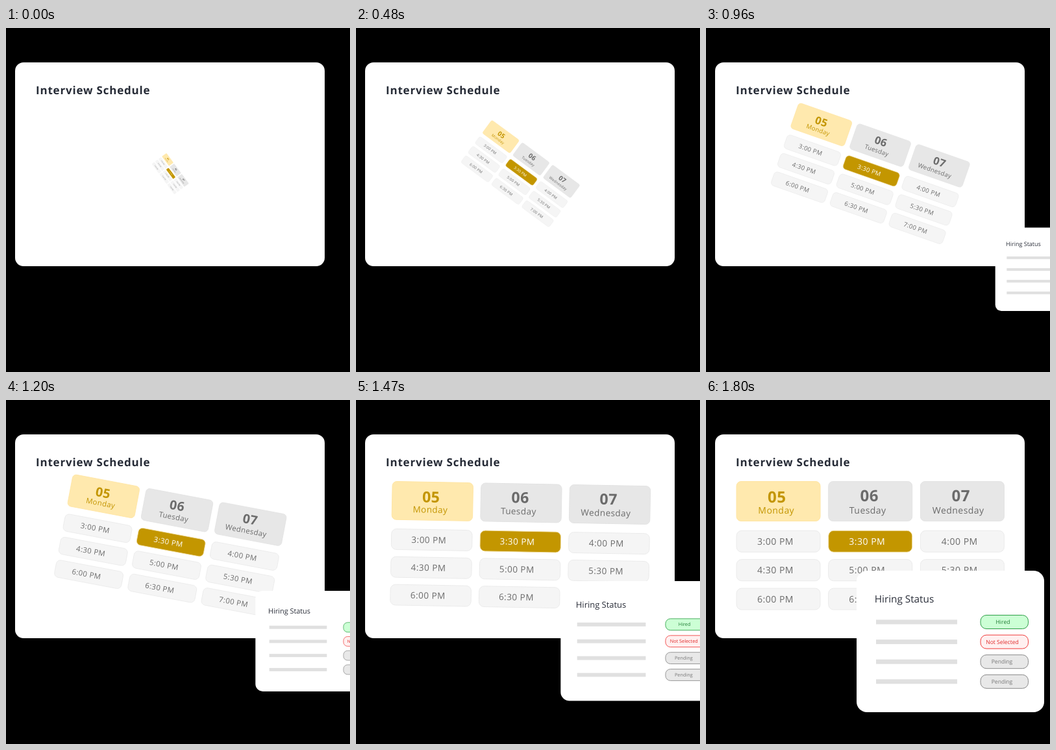
Write an HTML page that moves like this. It is 530 px wide and 530 px high and loops after 2.61 s.

```html
<!DOCTYPE html>
<html lang="en">
<head>
<meta charset="utf-8">
<title>Interview Schedule</title>
<style>
  html, body { margin: 0; height: 100%; overflow: hidden; background: #000; }
  svg { display: block; width: 100%; height: 100%; }
  text { font-family: "Open Sans", "Noto Sans", sans-serif; text-rendering: geometricPrecision; }
</style>
</head>
<body>
<svg id="stage" viewBox="0 0 530 530">
  <rect x="14" y="53" width="477" height="314" rx="13" fill="#fff"/>
  <text x="46" y="102" font-size="17" font-weight="700" letter-spacing=".8" fill="#262b36">Interview Schedule</text>
  <g id="grid"></g>
  <g id="status"></g>
</svg>
<script>
const LOOP = 2610, STEP = 30;
const grid = document.getElementById('grid');
const status_ = document.getElementById('status');

function add(parent, tag, attrs, content = '') {
  const el = document.createElementNS('http://www.w3.org/2000/svg', tag);
  for (const key in attrs) el.setAttribute(key, attrs[key]);
  el.textContent = content;
  parent.append(el);
}

function box(parent, x, y, width, height, rx, fill, stroke = 'none') {
  add(parent, 'rect', { x, y, width, height, rx, fill, stroke });
}

function label(parent, content, x, y, size, fill, weight = 400, spacing = 0) {
  add(parent, 'text', {
    x: x + spacing / 2, y, fill, 'font-size': size, 'font-weight': weight,
    'letter-spacing': spacing, 'text-anchor': 'middle'
  }, content);
}

// Schedule: number, its centre and baseline, day, its centre, slot text centre
const days = [
  ['05', 109, 158, 'Monday', 108, 106.8],
  ['06', 251.5, 156, 'Tuesday', 249, 248],
  ['07', 392.5, 156, 'Wednesday', 388.5, 390.5]
];
days.forEach(([num, numX, numY, day, dayX, slotX], col) => {
  const x = 47 + col * 141.7;
  const ink = col ? '#6b6b6b' : '#c39500';
  box(grid, x, 125.5, 129, 61, 7, col ? '#e7e7e7' : '#ffe9ae', col ? '#e3e3e3' : '#ffe5a2');
  label(grid, num, numX, numY, 24, ink, 700, .5);
  label(grid, day, dayX, 174.5, 14, ink, 400, .45);
  for (let row = 0; row < 3; row++) {
    const y = 201.3 + row * 44.4;
    const half = col + row * 3;
    const time = `${3 + (half >> 1) + (row === 0 ? 0 : 0)}:${half % 2 ? '30' : '00'} PM`;
    const picked = col === 1 && row === 0;
    box(grid, x, y, 129, 33, 8, picked ? '#c39600' : '#f5f5f5', picked ? '#f3e2ac' : '#ebebeb');
    label(grid, time, slotX, y + 21.7, 14, picked ? '#fff' : '#6b6b6b', 400, .5);
  }
});

// Status card, drawn from its own top left corner
box(status_, 0, 0, 289, 218, 16, '#fff');
label(status_, 'Hiring Status', 73.5, 48.5, 15.3, '#2b2f3a');
const pending = ['Pending', 224, '#e8e8e8', '#888', '#777'];
[
  ['Hired', 225.5, '#ccffd5', '#2c9e45', '#1f7a33'],
  ['Not Selected', 224.5, '#fff0f0', '#f03a3a', '#e02828'],
  pending,
  pending
].forEach(([name, x, fill, stroke, ink], row) => {
  const y = 79 + row * 30.6;
  box(status_, 30, y - 3.5, 125, 7, 0, '#e0e0e0');
  box(status_, 191, y - 10.5, 73.5, 21, 9, fill, stroke);
  label(status_, name, x, y + 3, 8.6, ink, 500);
});

function draw(now) {
  const t = Math.floor(now % LOOP / STEP) * STEP;
  const angle = Math.max(0, .0357 * (1500 - t));
  const zoom = Math.min(1, .141 + .00056 * t);
  grid.setAttribute('transform',
    `translate(253.2 224.5) rotate(${angle}) scale(${zoom}) translate(-253.2 -224.5)`);

  const left = Math.max(232, 507 - .2556 * (t - 720));
  const top = Math.max(263, 321 - .056 * (t - 720));
  const size = Math.min(1, .468 + .000504 * (t - 720));
  status_.setAttribute('transform', `translate(${left} ${top}) scale(${size})`);
}

function tick() {
  draw(performance.now());
  requestAnimationFrame(tick);
}
tick();
</script>
</body>
</html>
```
